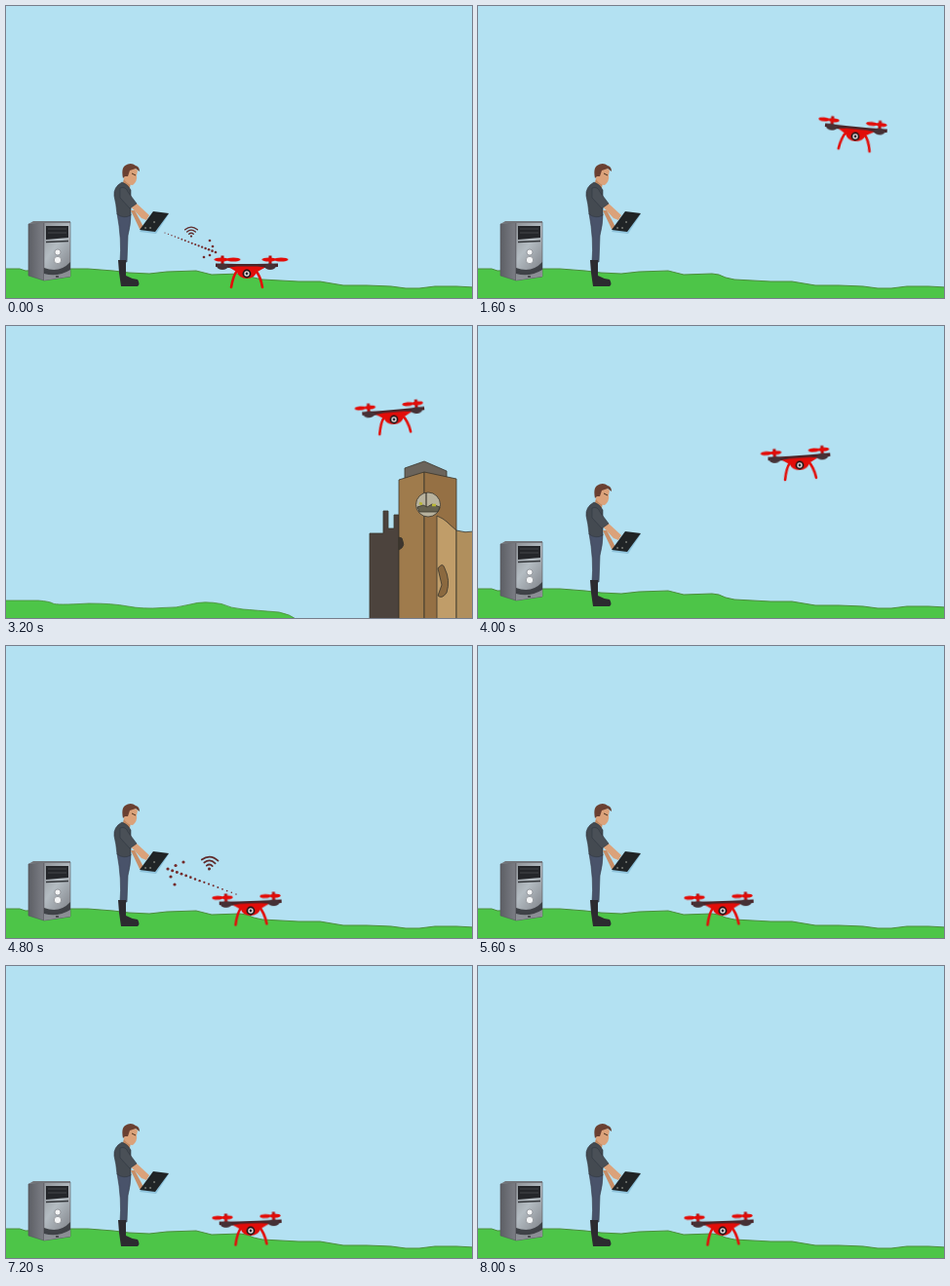
An HTML page for the animation above (8800 ms loop, 478x300 px).

```html
<!DOCTYPE html>
<html lang="en">
<head>
<meta charset="utf-8">
<title>Drone mission</title>
<style>
  html, body { margin: 0; width: 100%; height: 100%; overflow: hidden; background: #b3e1f2; }
  svg { display: block; width: 100vw; height: 100vh; }

  /* Eleven held poses of 800 ms each */
  #home, #city, #drone, .blades, #blast, #send, #reply, #ai {
    animation: 8.8s step-end infinite;
  }
  #home { animation-name: home; }
  #city { animation-name: city; }
  #drone { animation-name: fly; }
  .blades { animation-name: blades; }
  #blast { animation-name: blast; }
  #send { animation-name: send; }
  #reply { animation-name: reply; }
  #ai { animation-name: think; }

  @keyframes home { 0%, 45.45%, 100% { opacity: 1; } 27.27% { opacity: 0; } }
  @keyframes city {
    0%, 45.45%, 100% { opacity: 0; transform: none; }
    27.27% { opacity: 1; transform: none; }
    36.36% { opacity: 1; transform: translateX(125px); }
  }
  @keyframes fly {
    0% { transform: translate(247px, 275px); }
    9.09% { transform: translate(268px, 236px) rotate(3deg); }
    18.18% { transform: translate(387px, 134px) rotate(5.5deg); }
    27.27% { transform: translate(400px, 96px) rotate(6deg); }
    36.36% { transform: translate(398px, 96px) rotate(-5deg); }
    45.45% { transform: translate(330px, 143px) rotate(-4deg); }
    54.54%, 100% { transform: translate(251px, 272px) rotate(-2deg); }
  }
  @keyframes blades {
    0% { transform: translateX(5px) scaleX(1.25); }
    9.09%, 36.36%, 100% { transform: translateX(-3.5px); }
    27.27% { transform: translateX(1px); }
  }
  @keyframes blast { 0%, 36.36%, 100% { opacity: 0; } 27.27% { opacity: 1; } }
  @keyframes send { 0% { opacity: 1; } 9.09%, 100% { opacity: 0; } }
  @keyframes reply { 0%, 63.63%, 100% { opacity: 0; } 54.54% { opacity: 1; } }
  @keyframes think { 0%, 81.81%, 100% { opacity: 0; } 72.72% { opacity: 1; } }
</style>
</head>
<body>
<svg viewBox="0 0 478 300" preserveAspectRatio="none">
  <defs>
    <linearGradient id="panel" x2=".6" y2="1">
      <stop offset="0" stop-color="#8f9398"/><stop offset=".5" stop-color="#b4bcc2"/><stop offset="1" stop-color="#85898f"/>
    </linearGradient>
    <linearGradient id="side" x2="1">
      <stop offset="0" stop-color="#5d5f65"/><stop offset="1" stop-color="#7c7e85"/>
    </linearGradient>
    <g id="wifi" fill="none" stroke="#5f2b2b" stroke-width="1.7" stroke-linecap="round">
      <circle cy="-.5" r="1.5" fill="#5f2b2b" stroke="none"/>
      <path d="M-3-3.6Q0-6.4 3-3.6M-5.7-6.6Q0-11.6 5.7-6.6M-8.4-9.4Q0-16.6 8.4-9.4"/>
    </g>
  </defs>

  <rect width="478" height="300" fill="#b3e1f2"/>

  <g id="home">
    <path d="M-2 270H14L20 272 45 271 66 270 84 270 110 272 126 274 147 275 165 273 195 272 203 274 211 276 240 275 247 276 254 279 263 281 300 283 322 283 334 285 346 287 370 287 395 288 410 290 424 290 440 288 462 288 480 289V302H-2Z"
      fill="#4dc548" stroke="#4c8c3c" stroke-linejoin="round"/>

    <g id="computer">
      <path d="M23 224L39 222V282L23 277Z" fill="url(#side)" stroke="#55575b" stroke-width=".6"/>
      <path d="M39 222H66V278L39 282Z" fill="url(#panel)" stroke="#55575b" stroke-width=".6"/>
      <path d="M23 224L28 221H66V223H39Z" fill="#73757a"/>
      <path d="M41 226H64V238L41 240Z" fill="#24262a"/>
      <path d="M43 229H62M43 233H62" stroke="#4c4f55" stroke-width=".8"/>
      <path d="M41 242.5L64 241.5" stroke="#33363a" stroke-width="1.5"/>
      <path d="M39 269Q55 275 66 263V278L39 282Z" fill="#3f4247"/>
      <path d="M39 275Q53 279 66 271V278L39 282Z" fill="#8b8e94"/>
      <g fill="#f4f5f6" stroke="#82858a" stroke-width=".7">
        <circle cx="53" cy="253" r="3"/><circle cx="53" cy="261" r="3.7"/>
      </g>
      <path d="M51 278h3" stroke="#222" stroke-width="1.2"/>
    </g>

    <g id="man">
      <path d="M114 213L128 214Q128 224 125 236L124 263H117Q119 240 114 213Z" fill="#49536a" stroke="#343846" stroke-width=".6"/>
      <path d="M115 261H123L123 277Q128 280 135 281Q138 286 135 288H118L116 274Z" fill="#2c2b30"/>
      <path d="M121 177L128 181 127 187 119 186Z" fill="#c48a62"/>
      <path d="M122 166Q130 164 135 169L134 174Q135 180 130 184Q125 184 121 178Z" fill="#dba27a"/>
      <path d="M120 177Q118 167 122 164Q128 160 133 164Q137 165 137 170L133 167 127 169 125 175 122 175Z" fill="#6a4032"/>
      <path d="M129 172l4 2" stroke="#49301f"/>
      <path d="M119 181Q110 186 111 195Q113 203 114 214Q121 219 128 215L128 204 128 189Q125 183 119 181Z" fill="#444a51" stroke="#303740" stroke-width=".6"/>
      <path d="M128 210L137 229 142 230 139 223 132 210Z" fill="#c88f68"/>
      <path d="M151 213L167 214 154 234 137 232Z" fill="#8fc4dd"/>
      <path d="M151 211L167 213 153 232 137 230Z" fill="#202426"/>
      <path d="M143 228h.1M148 228h.1M152 222h.1" stroke="#c9c9bc" stroke-width="1.3" stroke-linecap="round"/>
      <path d="M127 205L133 202 147 215 144 220 139 218Z" fill="#dba27a"/>
      <path d="M117 187Q123 185 125 191L134 203 127 208 117 197Z" fill="#4a5057" stroke="#303740" stroke-width=".6"/>
    </g>

    <g id="send"><use href="#wifi" transform="translate(190 237) scale(.76)"/></g>
    <g id="reply"><use href="#wifi" transform="translate(208.5 229.5) rotate(4)"/></g>

    <g id="ai" fill="#4bb12c">
      <path d="M53 173V169M53 193V198M46 178L40 176M60 178L66 176M46 188L40 190M60 188L66 190M44 183H38M62 183H68" stroke="#4bb12c" stroke-width="1.3"/>
      <path d="M53 172L62 177.5V188.5L53 194 44 188.5V177.5Z"/>
      <path d="M53 174.5L60 178.7V187.3L53 191.5 46 187.3V178.7Z" fill="none" stroke="#b3e1f2" stroke-width=".8"/>
      <text x="53" y="185.7" font-family="Inter, Arial, sans-serif" font-size="7.5" font-weight="700" text-anchor="middle" fill="#d5eef0">AI</text>
      <circle cx="15.6" cy="146.5" r=".6"/>
    </g>
  </g>

  <g id="city" stroke="#39352c" stroke-width=".8" stroke-linejoin="round">
    <path d="M-127 282H-92Q-80 283 -77 285T-40 285Q-15 285 0 288T35 289.5Q50 290 64 286T96 285.5Q106 290 118 291T155 294Q166 296 174 302H-127Z" fill="#4dc548" stroke="#4c8c3c"/>
    <path d="M449 302V280L455 279 460 275 466 278 472 276 480 281V302Z" fill="#a17c50"/>
    <path d="M417 302V252L430 249 450 252V302Z" fill="#b8a692"/>
    <path d="M355 302V258L362 255 367 252 372 256 379 259V302Z" fill="#a27c4b"/>
    <path d="M379 302V220L398 213V302Z" fill="#796f68"/>
    <path d="M398 302V213L417 222V302Z" fill="#675d57"/>
    <path d="M248 302V213H262V190H267V208H273V194H278V302Z" fill="#4c433d"/>
    <path d="M284 157V146L304 139 327 149V157Z" fill="#6b645b"/>
    <path d="M278 302V158L304 150V302Z" fill="#9f7b4c"/>
    <path d="M304 302V150L337 157V302Z" fill="#957044"/>
    <path d="M278 217q4 0 4 4 2 4-1 7l-3 2z" fill="#3e362f"/>
    <circle cx="308" cy="183.5" r="12.5" fill="#b8b29d"/>
    <path d="M306 171V188" stroke-width="1.2"/>
    <path d="M297 186l6-2 4 2 5-3 8 3-2 5H299Z" fill="#666250"/>
    <path d="M299 182l3 1M312 184h4" stroke="#b8b637" stroke-width="2.5"/>
    <path d="M317 302V195Q324 198 327 201T337 210V302Z" fill="#c09d69"/>
    <path d="M337 302V210Q346 213 355 211V302Z" fill="#b08f5d"/>
    <path d="M318 249Q323 242 325 249Q331 261 327 274Q322 281 318 277L322 266Z" fill="#8b693f"/>
    <path d="M357 170Q361 159 372 158Q380 160 379 170T381 198Q383 211 388 220Q399 229 397 238Q393 246 384 243Q376 240 373 228Q370 216 365 208Q359 197 361 184Q355 176 357 170Z" fill="#3b3c31" stroke="#2e2f27"/>
  </g>

  <g id="drone">
    <path d="M-10-3Q-14 2-16 14M9-3Q14 2 16 14" fill="none" stroke="#e20d09" stroke-width="2.6" stroke-linecap="round"/>
    <path d="M-32-10.5L-10-10H10L32-10.5V-7L12-5.5H-12L-32-7Z" fill="#4a2529"/>
    <path d="M-18-6.5L-10-7.5H11L19-6.5 10-1.5Q8 5 0 5T-10-1.5Z" fill="#e20d09"/>
    <circle r="4.4" fill="#1d1517"/>
    <circle r="2.7" fill="#f2e6e6"/>
    <circle r="1.4" fill="#2a2a35"/>
  </g>

  <g id="blast" stroke="#15150c" stroke-linejoin="miter">
    <path d="M392 81L400 95 412 91 413 98 428 95 418 106 428 112 415 114 425 124 411 120 409 130 400 122 394 126 388 120 366 130 379 116 368 110 380 107 371 98 383 100 382 91 390 96Z" fill="#f4f71e" stroke-width="1.5"/>
  </g>
</svg>
<script>
  const NS = 'http://www.w3.org/2000/svg';

  function add(parent, tag, attrs) {
    const el = document.createElementNS(NS, tag);
    Object.entries(attrs).forEach(([key, value]) => el.setAttribute(key, value));
    parent.append(el);
    return el;
  }

  const dot = (parent, cx, cy, r, fill) => add(parent, 'circle', { cx, cy, r, fill });

  function rotor(x) {
    const group = add(document.getElementById('drone'), 'g', { transform: `translate(${x})` });
    add(group, 'path', { d: 'M-1.5-18.5h3v9h-3z', fill: '#b30d0d' });
    const blades = add(group, 'g', { class: 'blades', fill: '#e20d09' });
    for (const side of [-1, 1]) {
      add(blades, 'ellipse', { cx: side * 5, cy: -14.5, rx: 5.8, ry: 2.1 });
    }
    add(group, 'ellipse', { cy: -7.3, rx: 5.6, ry: 3.2, fill: '#453136' });
  }

  // Dotted shaft that thickens towards the tip, plus the dots of the arrowhead
  function arrow(id, [x0, y0], [x1, y1], size, head) {
    const group = document.getElementById(id);
    const count = 15;
    for (let i = 0; i <= count; i++) {
      const k = i / count;
      dot(group, x0 + (x1 - x0) * k, y0 + (y1 - y0) * k, size * (0.45 + 0.55 * k), '#732a2a');
    }
    head.forEach(([x, y]) => dot(group, x, y, size, '#732a2a'));
  }

  rotor(-25);
  rotor(24);

  arrow('send', [163, 233], [215, 253], 1.35, [[209, 241], [212, 247], [209, 256], [203, 258]]);
  arrow('reply', [236, 255], [166, 229], 1.6, [[182, 222], [174, 225.5], [169, 237], [173, 245]]);

  const ai = document.getElementById('ai');
  for (let i = 0; i < 14; i++) {
    const a = -(2 + i * 360 / 14) * Math.PI / 180;
    dot(ai, 51.4 + 34.4 * Math.cos(a), 182.6 + 34.4 * Math.sin(a), 6.9 - 0.47 * i, '#4bb12c');
  }
  // Terminals at the ends of the circuit traces
  for (const [x, y] of [[53, 168], [53, 199], [39, 176], [67, 176], [39, 190], [67, 190], [37, 183], [69, 183]]) {
    dot(ai, x, y, 1.9, '#4bb12c');
  }
</script>
</body>
</html>
```
